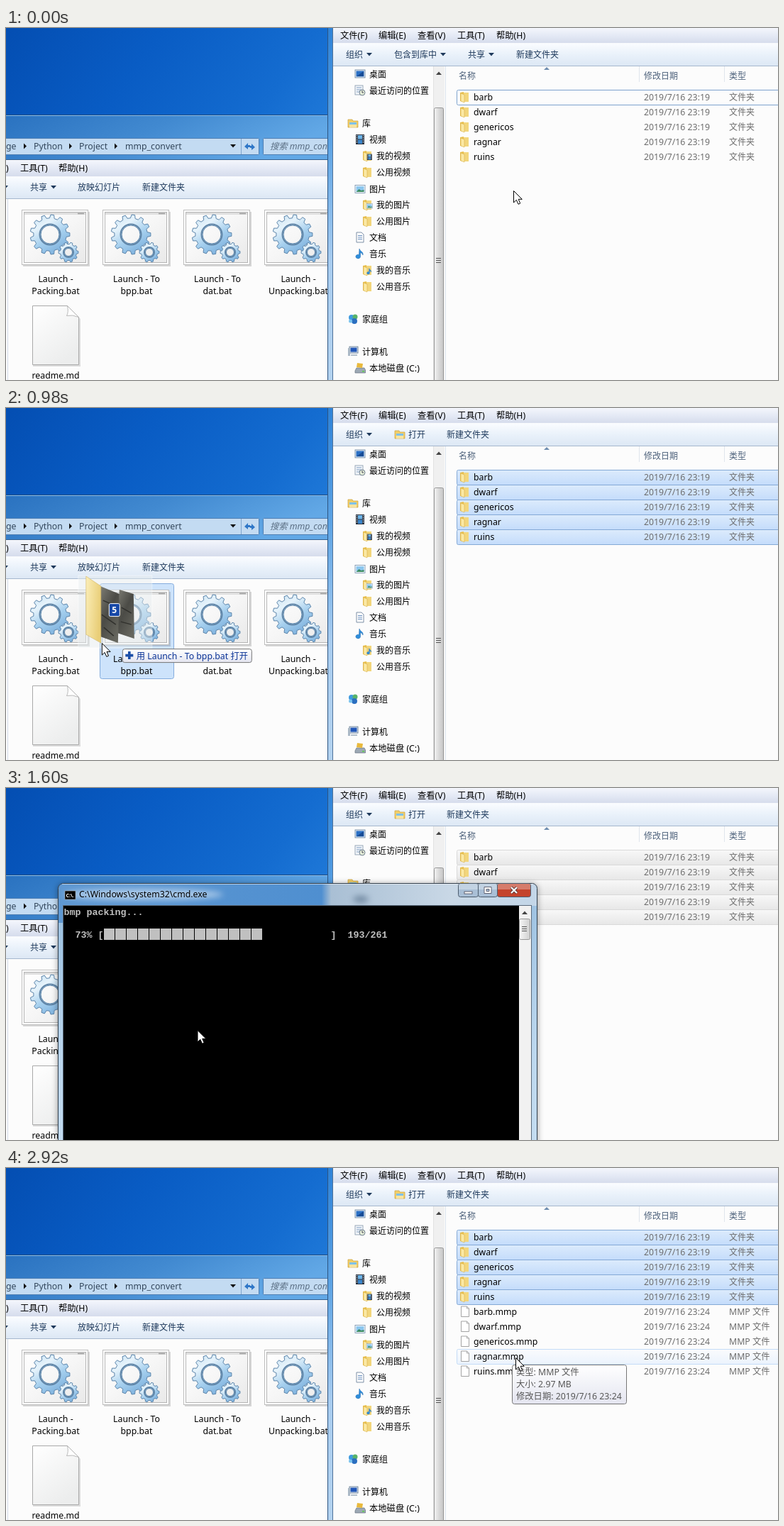
An HTML page for the animation above (3.42 s loop, 1088 by 496 pixels).

```html
<!DOCTYPE html>
<html lang="zh-CN">
<head>
<meta charset="utf-8">
<title>Packing folders</title>
<style>
html, body { margin: 0; width: 100%; height: 100%; overflow: hidden; background: #fcfcfc; }
#stage { position: absolute; left: 0; top: 0; width: 100%; height: 100%; overflow: hidden; overflow: clip; contain: strict; }
svg { position: absolute; left: 0; top: 0; width: 1088px; height: 100%; overflow: visible; }
text { font-family: "Noto Sans", "Noto Sans CJK SC", "Noto Sans CJK", sans-serif; white-space: pre; }
#cmd { transform-origin: 410.5px 355px; filter: drop-shadow(0 1px 4px rgba(0,0,0,.4)); }
#cmd .mono { font: bold 13.33px "Liberation Mono", "DejaVu Sans Mono", monospace; }
.soft { filter: blur(4px); }
</style>
</head>
<body>
<div id="stage">
<svg id="base"></svg>
<svg id="cmd"></svg>
<svg id="top"></svg>
</div>
<script>
const LOOP = 3420;
const $ = id => document.getElementById(id);
const clamp = v => Math.max(0, Math.min(1, v));

// --- markup helpers ---
const R = (x, y, w, h, fill, more = '') =>
  `<rect x="${x}" y="${y}" width="${w}" height="${h}" fill="${fill}" ${more}/>`;
const P = (d, fill, more = '') => `<path d="${d}" fill="${fill}" ${more}/>`;
const T = (s, x, y, fill = '#000', more = '') =>
  `<text x="${x}" y="${y}" font-size="${/[!-~]/.test(s) ? 12.3 : 12}" fill="${fill}" ${more}>${s}</text>`;
const G = (id, body, more = '') => `<g id="${id}" ${more}>${body}</g>`;
const grad = (id, stops, x2 = 0, y2 = 1) =>
  `<linearGradient id="${id}" x2="${x2}" y2="${y2}">` + stops.map((c, i) =>
    `<stop offset="${i / (stops.length - 1)}" stop-color="${c}"/>`).join('') + '</linearGradient>';
const line = (d, color, w = 1) => P(d, 'none', `stroke="${color}" stroke-width="${w}"`);
const down = (x, y, c = '#1e395b') => P(`M${x - 4} ${y - 2}h8l-4 4.5z`, c);
const box = (x, y, w, h, fill, stroke, r = 2, more = '') =>
  R(x + .5, y + .5, w - 1, h - 1, fill, `stroke="${stroke}" rx="${r}" ${more}`);
const glow = (x, y, rx, ry, fill, opacity) =>
  `<ellipse class="soft" cx="${x}" cy="${y}" rx="${rx}" ry="${ry}" fill="${fill}" opacity="${opacity}"/>`;

function gear(cx, cy, r, n, hole) {
  let d = '';
  for (let i = 0; i < n * 4; i++) {
    const a = (Math.floor(i / 4) + [-.3, -.17, .17, .3][i % 4]) / n * 2 * Math.PI;
    const q = i % 4 === 1 || i % 4 === 2 ? r : r * .83;
    d += (i ? 'L' : 'M') + (cx + q * Math.cos(a)).toFixed(1) + ' ' + (cy + q * Math.sin(a)).toFixed(1);
  }
  d += `ZM${cx - hole} ${cy}a${hole} ${hole} 0 1 0 ${2 * hole} 0a${hole} ${hole} 0 1 0 ${-2 * hole} 0Z`;
  return P(d, 'url(#steel)', 'fill-rule="evenodd" stroke="#5c85ab" stroke-width="1"') +
    `<circle cx="${cx}" cy="${cy}" r="${hole + 1.5}" fill="none" stroke="#5f84a6" stroke-width="2"/>`;
}

// --- small icons on a 16 px grid ---
const folder = P('M2 2l5-1v14l-5-1z', '#e9bf4c') + P('M7 2h7v13H7z', '#f2d67c') +
  P('M3 3l5 2v11l-5-2z', '#fbe9a4', 'stroke="#d9b04a" stroke-width=".6"');
const screen = R(1, 2, 14, 11, '#e8eef5', 'stroke="#5f7d9c" stroke-width=".8"') + R(2.5, 3.5, 11, 8, '#2a6fc4') +
  P('M3 11l10-7v7z', '#174b94');
const film = R(2, 1, 12, 14, '#2b3340') + R(5, 2, 6, 5.5, '#6cb4e8') + R(5, 8.5, 6, 5.5, '#3b86cc') +
  P('M3.5 2V14M12.5 2V14', 'none', 'stroke="#d5dde6" stroke-width="1.2" stroke-dasharray="1.5 1.5"');
const photo = R(1, 2.5, 14, 11, '#fff', 'stroke="#6d8aa8" stroke-width=".8"') + R(2.5, 4, 11, 8, '#8cc6ee') +
  P('M2.5 12l4-4 3 2 4-1v3z', '#3c8b62');
const sheet = P('M3 1h7l3 3v11H3z', '#fff', 'stroke="#71859c" stroke-width=".9"') +
  line('M5 5.5h6M5 8h6M5 10.5h6', '#6a8fbd');
const note = P('M7 1c1 4 6 4 5 9-1-3-3-3-3.5-3.5V12a3.3 2.8 0 1 1-2-2.5z', '#2f8fdc', 'stroke="#1d62a8" stroke-width=".5"');
const small = s => `<g transform="translate(6.5 5) scale(.6)">${s}</g>`;
const icons = {
  folder, screen, film, photo, sheet, note,
  recent: R(1, 1, 11, 13, '#f3f6fa', 'stroke="#8093a8" stroke-width=".8"') + line('M3 4h7M3 7h7M3 10h4', '#7f9cc0') +
    '<circle cx="11" cy="11" r="4" fill="#e4ecd8" stroke="#708090"/>' + line('M11 8.5V11h2', '#445'),
  lib: P('M1 3h6l1 2h7v9H1z', '#f1cf6a', 'stroke="#c99f3c" stroke-width=".7"') + R(3, 7, 10, 7, '#7fc1ea') + R(3, 10, 10, 4, '#f7e3a0'),
  film2: folder + small(film), photo2: folder + small(photo), note2: folder + small(note),
  home: '<circle cx="6" cy="6" r="4" fill="#3f9be0"/><circle cx="11" cy="5" r="3.5" fill="#58b36a"/><circle cx="10" cy="11" r="4" fill="#2b6fc0"/><circle cx="4.5" cy="11" r="2.5" fill="#7cc4ee"/>',
  pc: R(3, 1, 12, 9, '#dfe7ef', 'stroke="#566f8a" stroke-width=".8"') + R(4.5, 2.5, 9, 6, '#2257b8') + R(1, 3, 3, 11, '#aab8c6') + R(5, 12, 9, 2, '#b4c0cc'),
  disk: P('M3 8h11l1.5 3v4H1v-3z', '#9da9b5', 'stroke="#66727e" stroke-width=".7"') + P('M4 1l8 1-1 6-8-1z', '#e9b93c') + R(11, 12, 3, 1.5, '#5fd04a'),
  page: P('M2.5 1h8l3 3v11.5h-11z', '#fff', 'stroke="#9a9a9a" stroke-width=".9"') + line('M10.5 1v3h3', '#9a9a9a', .8)
};
const icon = (name, x, y) => `<g transform="translate(${x} ${y})">${icons[name]}</g>`;

// --- content ---
const names = ['barb', 'dwarf', 'genericos', 'ragnar', 'ruins'];
const counts = [46, 52, 52, 47, 64];
const bats = ['Packing', 'To bpp', 'To dat', 'Unpacking'];
const nav = [
  ['桌面', 65, 1, 'screen'], ['最近访问的位置', 88, 1, 'recent'], ['库', 134, 0, 'lib'],
  ['视频', 157, 1, 'film'], ['我的视频', 180, 2, 'film2'], ['公用视频', 203, 2, 'folder'],
  ['图片', 227, 1, 'photo'], ['我的图片', 249, 2, 'photo2'], ['公用图片', 272, 2, 'folder'],
  ['文档', 295, 1, 'sheet'], ['音乐', 318, 1, 'note'], ['我的音乐', 341, 2, 'note2'],
  ['公用音乐', 364, 2, 'folder'], ['家庭组', 410, 0, 'home'], ['计算机', 456, 0, 'pc'],
  ['本地磁盘 (C:)', 479, 1, 'disk']
];
const rowTop = i => 87 + 21 * i;

const defs = '<defs>' +
  grad('desk', ['#044eb2', '#095cc4', '#146cd0', '#2b86e0'], .9, .7) +
  grad('glass', ['#2a72c0', '#4189d0', '#62a8e6'], 1, .3) +
  grad('edge', ['#2f83d8', '#5ea4e4', '#a9cdf0', '#b4d3f0']) +
  grad('menu', ['#f4f6fc', '#e4e9f5', '#d4dbeb']) +
  grad('tool', ['#fafcff', '#e9f1fa', '#dce7f4']) +
  grad('blue', ['#dcebfc', '#c4dcfb']) +
  grad('grey', ['#f8f8f8', '#e7e7e7']) +
  grad('hover', ['#fafbfd', '#ebf3fd']) +
  grad('tipFill', ['#ffffff', '#e4e5f0']) +
  grad('steel', ['#c3dff2', '#e6f3fb', '#a5cfee', '#7fb2de'], .6, 1) +
  grad('paper', ['#ffffff', '#eceded'], .6, 1) +
  grad('thumbBg', ['#ffffff', '#f6f6f6', '#e9e9e9'], 1, 1) +
  grad('bar', ['#f4f4f4', '#dadada', '#c6c6c6'], 1, 0) +
  grad('flap', ['#fbeeb8', '#e9ce78'], 1, .3) +
  grad('rock', ['#7d7d74', '#4b4b46', '#66665e'], .7, 1) + '</defs>';

function thumb(i) {
  const label = i === 1 || i === 2 ? ['Launch - To', bats[i].slice(3) + '.bat'] : ['Launch -', bats[i] + '.bat'];
  const mid = 'text-anchor="middle"';
  return `<g transform="translate(${114 * i})">` +
    box(18, 247, 105, 135, '#cde3fb', '#84acdd', 3, `id="bat${i}"`) +
    R(24, 259, 94, 77, '#000', 'opacity=".15"') + box(22, 256, 94, 78, '#fff', '#bdbdbd', 0) +
    box(25, 259, 88, 72, 'url(#thumbBg)', '#b5b5b5', 0) + line('M26 261.5h86', '#dedede', 3) +
    line('M101 261.5h9', '#999', 1.5) + gear(62, 291, 28, 13, 13) + gear(88, 316, 14, 10, 5.5) +
    T(label[0], 70, 358, '#000', mid) + T(label[1], 70, 375, '#000', mid) + '</g>';
}

function leftWindow() {
  const ink = '#33475c';
  return R(0, 0, 460, 496, 'url(#desk)') + R(0, 122, 454, 64, 'url(#glass)') +
    line('M0 122.5h454', '#1d4a80') + line('M0 123.5h454', '#86bcec') +
    box(-4, 155, 361, 24, '#c3dbf2', '#4f7eb2', 1) + box(362, 155, 110, 24, '#c3dbf2', '#4f7eb2', 1) +
    line('M331.5 156v22', '#7fa5cd') + T('ge', 0, 171, ink) + T('Python', 39, 171, ink) +
    T('Project', 103, 171, ink) + T('mmp_convert', 168, 171, ink) +
    [25, 89, 153].map(x => P(`M${x} 162.5v8l4-4z`, '#111')).join('') + down(320, 166, '#111') +
    P('M336 167l5-5v3h3v3h-3v3z', '#2f77c8') + P('M351 168l-5-5v3h-2v3h2v3z', '#2f77c8') +
    T('搜索 mmp_convert', 372, 171, '#5b6f84', 'font-style="italic"') +
    line('M0 185.5h454', '#35618f') + R(0, 186, 454, 24, 'url(#menu)') +
    T(')', 0, 202) + T('工具(T)', 20, 202) + T('帮助(H)', 74, 202) +
    R(0, 210, 454, 31, 'url(#tool)') + line('M0 209.5h454', '#f7f9fc') + line('M0 240.5h454', '#a6b8ce') +
    down(-1, 224) + T('共享', 34, 229, '#1e395b') + down(67, 224) +
    T('放映幻灯片', 101, 229, '#1e395b') + T('新建文件夹', 192, 229, '#1e395b') +
    R(0, 241, 454, 255, '#fcfcfc') + line('M2.5 241V496', '#d3dce8') +
    bats.map((_, i) => thumb(i)).join('') +
    P('M38 393h50l17 17v67H38z', '#000', 'opacity=".12"') +
    P('M37.5 391.5h49l16 16v67h-65z', 'url(#paper)', 'stroke="#a9a9a9"') +
    P('M86.5 391.5q2 9-1 14 8-2 17 2z', '#fff', 'stroke="#a9a9a9" stroke-width=".8"') +
    T('readme.md', 70, 494, '#000', 'text-anchor="middle"');
}

function fileRow(i) {
  const mmp = i > 4, y = rowTop(i) + 15, soft = '#6d6d6d';
  return G('row' + i, box(635, rowTop(i), 470, 22, 'none', 'none', 2, `id="bg${i}"`) +
    icon(mmp ? 'page' : 'folder', mmp ? 639 : 638, rowTop(i) + 2) +
    T(names[i % 5] + (mmp ? '.mmp' : ''), 659, y) +
    T(`2019/7/16 23:${mmp ? 24 : 19}`, 899, y, soft) + T(mmp ? 'MMP 文件' : '文件夹', 1019, y, soft));
}

function rightWindow() {
  const ink = '#1e395b', head = '#4c607a';
  const menus = [['文件(F)', 471], ['编辑(E)', 525], ['查看(V)', 580], ['工具(T)', 636], ['帮助(H)', 691]];
  const arrows = nav.filter(n => n[2] < 2 && n[1] > 100).map(([, y, lv]) => {
    const x = 473 + 10 * lv;
    return y < 400 && y !== 295 ? P(`M${x + 5} ${y - 3}v6h-6z`, '#555') :
      P(`M${x} ${y - 4}v8l4-4z`, '#fff', 'stroke="#999"');
  }).join('');
  return R(461, 0, 627, 496, '#fcfcfc') + R(454, 0, 7, 496, 'url(#edge)') +
    line('M453.5 0V496', '#2d5582') + line('M460.5 0V496', '#4f7299') +
    R(461, 0, 627, 22, 'url(#menu)') + menus.map(m => T(m[0], m[1], 15)).join('') +
    R(461, 22, 627, 32, 'url(#tool)') + line('M461 21.5h627', '#f7f9fc') + line('M461 53.5h627', '#a6b8ce') +
    T('组织', 479, 42, ink) + down(512, 37) +
    G('toolIdle', T('包含到库中', 547, 42, ink) + down(616, 37) + T('共享', 651, 42, ink) + down(684, 37) + T('新建文件夹', 719, 42, ink)) +
    G('toolOpen', icon('lib', 547, 29) + T('打开', 567, 42, ink) + T('新建文件夹', 621, 42, ink)) +
    nav.map(([s, y, lv, ic]) => icon(ic, 481 + 10 * lv, y - 8) + T(s, 502 + 10 * lv, y + 4.5)).join('') +
    G('arrows', arrows) +
    R(602, 54, 16, 442, '#f0f0f0') + line('M602.5 54V496', '#e2e2e2') + P('M606 66h8l-4-4.5z', '#444') +
    box(603, 112, 14, 400, 'url(#bar)', '#979797') + line('M606 324.5h7M606 327.5h7M606 330.5h7', '#555') +
    line('M619.5 54V496', '#dbe4ee') +
    T('名称', 638, 72, head) + T('修改日期', 899, 72, head) + T('类型', 1019, 72, head) +
    line('M892.5 54V76M1012.5 54V76', '#dfe5ec') + P('M758 59h8l-4-4z', '#6f8db0') +
    [...Array(10).keys()].map(fileRow).join('');
}

// --- console ---
const mono = (s, y, id = '') => `<text class="mono" ${id && `id="${id}"`} x="81.5" y="${y}" fill="#c0c0c0">${s}</text>`;
function cmdWindow() {
  const btn = (x, w, f) => box(x, 134, w, 20, f, '#4d5d6e', 3) + R(x + 1, 135, w - 2, 8, '#fff', 'opacity=".3"');
  const report = mono('261 images processed done! A total of 5 mmp files:', 243) +
    names.map((n, i) => mono(`new "${n}.mmp": add textures ${counts[i]}.`, 259 + 16 * i)).join('') +
    mono('Time used: 0.70 sec', 355);
  // the title glass shows the blue desktop up to the edge of the other window
  const title = '<linearGradient id="frame"><stop stop-color="#5f98d2"/><stop offset=".55" stop-color="#4f8fd0"/>' +
    '<stop offset=".57" stop-color="#a9bfd4"/><stop offset=".82" stop-color="#c9d8e6"/><stop offset="1" stop-color="#c3d6e8"/></linearGradient>';
  const glass = box(73, 134, 676, 442, 'url(#frame)', '#33414f', 7) +
    R(74, 190, 7, 380, 'url(#side)') + R(741, 166, 7, 404, 'url(#side)') +
    line('M79 135.5h664', '#ffffff90') + glow(194, 150, 112, 8, '#fff', .5) + glow(500, 157, 11, 5, '#35506c', .5);
  return '<defs>' + title + grad('side', ['#9fc3e2', '#bcd7ee', '#c8dff2']) + grad('bar2', ['#f6f6f6', '#cfcfcf'], 1, 0) + '</defs>' +
    G('glassFrame', glass) + box(80, 165, 661, 404, '#000', '#5b6b7c', 0) +
    R(83, 145, 15, 12, '#000', 'stroke="#aaa" stroke-width=".6"') +
    '<text x="84.5" y="154" font-size="7" font-weight="bold" fill="#fff">C:\\.</text>' +
    T('C:\\Windows\\system32\\cmd.exe', 103, 154) +
    btn(637, 29, '#a9bfd6') + btn(665, 28, '#a9bfd6') + btn(692, 48, '#c4432c') +
    R(646, 146, 11, 3, '#fff', 'stroke="#445" stroke-width=".8"') +
    P('M674 139.5h10v9h-10zM677 142.5h4v3h-4z', '#fff', 'fill-rule="evenodd" stroke="#445" stroke-width=".8"') +
    line('M712 140l8 8M720 140l-8 8', '#533', 4) + line('M712 140l8 8M720 140l-8 8', '#fff', 2.4) +
    R(723, 166, 17, 402, '#f1f1f1') + P('M727 178h8l-4-4.5z', '#444') + box(723, 184, 16, 30, 'url(#bar2)', '#979797') +
    line('M727 195.5h7M727 198.5h7M727 201.5h7', '#555') +
    mono('bmp packing...', 179) +
    G('meter', mono('', 211, 'pct') + G('blocks', [...Array(20).keys()].map(i => R(138 + 16 * i, 198, 15, 16, '#c0c0c0')).join(''))) +
    G('report', report) +
    '<text id="prompt" x="82" y="388" font-size="16" fill="#c0c0c0"></text>' +
    '<text id="dots" class="mono" x="194" y="387" fill="#c0c0c0">. . .</text>';
}

// --- pointer layer, drawn around its own tip ---
const ghost = R(-33, -95, 104, 102, '#e8eef0', 'opacity=".45" stroke="#fff"') +
  P('M25-75l20 6 1 63-24-8z', 'url(#rock)') + P('M-2-80l27 11-2 69-25-9z', 'url(#rock)') +
  line('M2-60l18 8M0-40l20 14M3-22l14 12M28-50l14 8M27-30l15 4', '#30302c', 1.5) +
  P('M-22-94l21 14V0l-21-12z', 'url(#flap)', 'stroke="#d2b565" stroke-width=".6"') +
  box(10, -56, 16, 19, '#1648a8', '#fff', 2) +
  '<text x="18" y="-42" font-size="12" font-weight="bold" fill="#fff" text-anchor="middle">5</text>';
const arrow = P('M.5.5V17l3.8-3.7L7 19.3l2.7-1.2L7.2 12.3H12.3z', '#fff', 'stroke="#000" stroke-width="1"');
const tip = box(713, 277, 162, 56, 'url(#tipFill)', '#767676', 3) +
  ['类型: MMP 文件', '大小: 2.97 MB', '修改日期: 2019/7/16 23:24'].map((s, i) => T(s, 719, 291.5 + 17 * i, '#575757')).join('');

$('base').innerHTML = defs + leftWindow() + rightWindow();
$('cmd').innerHTML = cmdWindow();
$('top').innerHTML = R(0, 0, 0, 0, '#3399ff', 'id="band" fill-opacity=".3" stroke="#3399ff"') + G('tip', tip) +
  '<circle id="ring" fill="#f0a070" fill-opacity=".35" stroke="#c4522c" stroke-width="3.5"/>' +
  G('mouse', G('ghost', ghost) +
    G('drop', box(29, 8, 189, 20, 'url(#tipFill)', '#767676', 3, 'id="dropBox"') +
      line('M39 12v11M33.5 17.5h11', '#1c4fa8', 3.6) + T('用', 49, 22.5, '#0a3396', 'id="dropText"')) + arrow);
$('dropText').setAttribute('font-size', 12.3);

// --- motion ---
const route = [
  [0, 715, 229], [100, 715, 229], [180, 725, 234], [220, 725, 234], [540, 668, 93], [640, 680, 97],
  [660, 680, 97], [700, 672, 103], [980, 135, 331], [1100, 108, 341], [1400, 108, 341],
  [1700, 349, 341], [2400, 349, 341], [2460, 354, 341], [2700, 718, 267], [LOOP, 718, 267]
];
function pointer(t) {
  const i = Math.max(1, route.findIndex(k => k[0] > t));
  const [a, b] = [route[i - 1], route[i]], u = (t - a[0]) / (b[0] - a[0]);
  return [a[1] + (b[1] - a[1]) * u, a[2] + (b[2] - a[2]) * u];
}
const set = (id, o) => { for (const k in o) $(id).setAttribute(k, o[k]); };
const show = (id, on) => set(id, { visibility: on ? 'visible' : 'hidden' });
const fade = (id, v) => set(id, { opacity: clamp(v) });

function drawRows(t, x, y) {
  const dim = t >= 1180 && t < 2320;
  const picked = i => t >= 220 && (t >= 540 || y < rowTop(i) + 21);
  for (let i = 0; i < 10; i++) {
    let fill = 'none', stroke = 'none';
    if (i > 4) {
      if (t > 2460 && x > 635 && y >= rowTop(i) && y < rowTop(i) + 21) [fill, stroke] = ['url(#hover)', '#c4dcf7'];
      show('row' + i, t >= 1760);
    } else if (picked(i)) [fill, stroke] = dim ? ['url(#grey)', '#d9d9d9'] : ['url(#blue)', '#84a9d6'];
    else if (i === 0) stroke = '#7da2ce';
    set('bg' + i, { fill, stroke });
  }
  show('toolIdle', !picked(4));
  show('toolOpen', picked(4));
}

function drawDrag(t, x, y) {
  const on = t > 720 && t < 1150;
  const over = on && y > 247 && y < 382 ? bats.findIndex((_, i) => x >= 18 + 114 * i && x < 123 + 114 * i && x < 453) : -1;
  bats.forEach((_, i) => show('bat' + i, i === over));
  fade('ghost', on ? (t - 700) / 100 * .85 : 0);
  show('drop', over >= 0);
  if (over >= 0) {
    $('dropText').textContent = `用 Launch - ${bats[over]}.bat 打开`;
    set('dropBox', { width: Math.round($('dropText').getComputedTextLength()) + 25 });
  }
}

function drawConsole(t) {
  const on = t >= 1200 && t < 2420;
  $('cmd').style.display = on ? '' : 'none';
  if (!on) return;
  const opening = t < 2290;
  const k = opening ? (1 - clamp((t - 1180) / 240)) ** 2 : clamp((t - 2270) / 150);
  $('cmd').style.opacity = opening ? 1 - .7 * k : 1 - k;
  $('cmd').style.transform = k ?
    `translateY(${-7 * k}px) perspective(1000px) scale(${1 - .097 * k}) rotateX(${-8.5 * k}deg)` : 'none';
  fade('glassFrame', 1 - 1.3 * k);
  const done = Math.round(261 * clamp((t - 1320) / 380)), part = done / 261;
  show('meter', t >= 1320);
  const pct = String(Math.floor(part * 100)).padStart(4);
  $('pct').textContent = `${pct}% [${' '.repeat(40)}]  ${done}/261`;
  [...$('blocks').children].forEach((b, i) => b.setAttribute('opacity', i < Math.floor(part * 20) ? 1 : 0));
  show('report', t >= 1720);
  $('prompt').textContent = t < 1720 ? '' : t < 1760 ? '请' : '请按任意键继续';
  show('dots', t >= 1760);
}

function drawPointer(t, x, y) {
  set('mouse', { transform: `translate(${x.toFixed(1)} ${y.toFixed(1)})` });
  show('band', t > 220 && t < 550);
  set('band', { x: Math.min(725, x), y: Math.min(234, y), width: Math.abs(725 - x), height: Math.abs(234 - y) });
  const second = t >= 660, age = t - (second ? 660 : 200);
  set('ring', { cx: second ? 680 : 725, cy: second ? 97 : 234, r: 5 + clamp(age / 120) * 12 });
  fade('ring', age < 0 ? 0 : (120 - age) / 80);
}

function draw(t) {
  const [x, y] = pointer(t);
  drawRows(t, x, y);
  drawDrag(t, x, y);
  drawConsole(t);
  drawPointer(t, x, y);
  fade('arrows', Math.min((t - 2560) / 120, (2900 - t) / 160));
  fade('tip', (t - 2800) / 120);
}

const start = performance.now();
function tick() {
  draw((performance.now() - start) % LOOP);
  requestAnimationFrame(tick);
}
tick();
</script>
</body>
</html>
```
